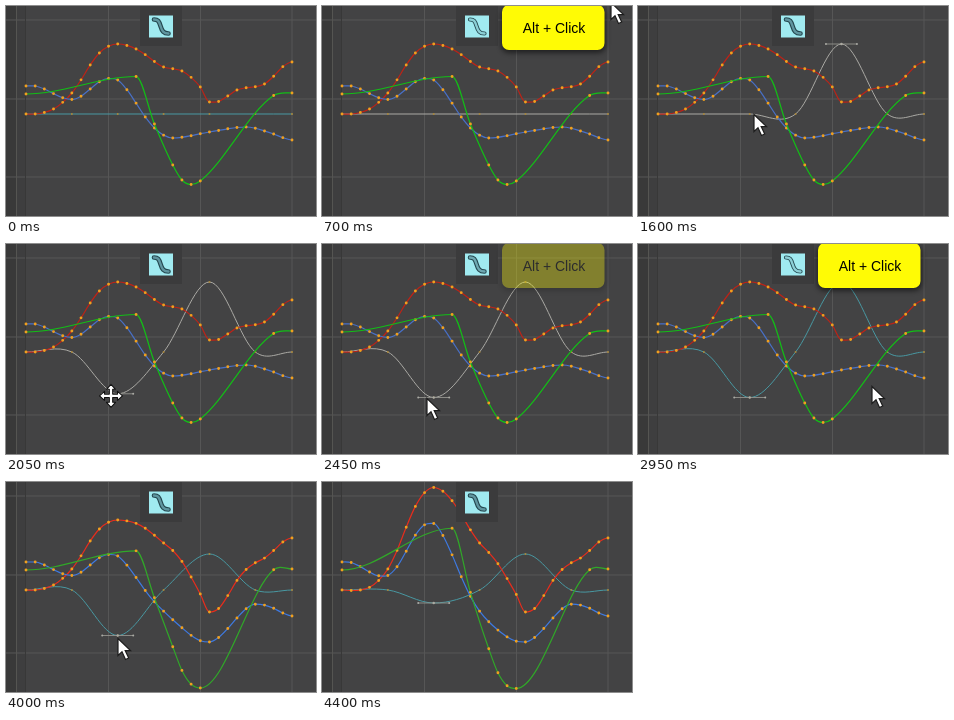
An HTML page that plays this animation: 310 by 210 pixels, repeating every 4650 ms.

```html
<!DOCTYPE html>
<html lang="en">
<head>
<meta charset="utf-8">
<title>Graph editor</title>
<style>
  html, body { margin: 0; width: 100%; height: 100%; overflow: hidden; background: #434344; }
  svg { display: block; width: 100vw; height: 100vh; }
</style>
</head>
<body>
<svg viewBox="0 0 310 210">
  <defs>
    <filter id="blur" x="-20%" y="-40%" width="140%" height="180%"><feGaussianBlur stdDeviation="2.5"/></filter>
  </defs>
  <rect width="310" height="210" fill="#434344"/>
  <rect x="11" width="8" height="210" fill="#3e3e3f"/>
  <rect width="10" height="210" fill="#393939"/>
  <path d="M0 14H310M0 93H310M0 171H310M102.5 0V210M194.5 0V210M286 0V210" stroke="#565656"/>
  <path d="M10.5 0V210" stroke="#555552"/>
  <path d="M19.5 0V210" stroke="#383838"/>
  <g id="curves" fill="none" stroke-linecap="round"></g>
  <g id="handle" stroke="#93938e" fill="#aaaaa4">
    <path d="M-15.5 0H15.5" stroke-width=".9"/>
    <g stroke="none"><circle cx="-15.5" r="1"/><circle cx="15.5" r="1"/><circle r="1.2"/></g>
  </g>
  <rect x="134" width="42" height="40" fill="#3b3b3c"/>
  <rect x="143" y="9.5" width="24" height="22" fill="#a0eaf0"/>
  <g fill="none" stroke-linecap="round">
    <path id="glyph" d="M148 13.5C152 13.5 153 15 154.5 20S157.500 27.500 162.500 27.500" stroke="#24474f"/>
    <path id="core" d="M148 13.5C152 13.5 153 15 154.5 20S157.500 27.500 162.500 27.500"/>
  </g>
  <g id="popup">
    <rect x="179" y="1" width="105" height="46" rx="8" fill="#000" opacity=".5" filter="url(#blur)"/>
    <rect x="180" y="-1" width="102.5" height="45" rx="7" fill="#fffb05"/>
    <text x="232" y="27" text-anchor="middle" font-family="'Liberation Sans', Arial, sans-serif" font-size="14" fill="#000">Alt + Click</text>
  </g>
  <path id="arrow" d="M0 .5V17.500L4 13.7L7.500 21.500L10.700 20L7.200 12.600H12.500Z" fill="#fff" stroke="#1c1c1c" stroke-width="1.2"/>
  <path id="move" fill="#fff" stroke="#111" stroke-width="1.1" stroke-linejoin="round"/>
</svg>
<script>
const LOOP = 4650, STEP = 50;
const $ = id => document.getElementById(id);
const ramp = (t, a, b) => Math.max(0, Math.min(1, (t - a) / (b - a)));
const easeOut = p => 1 - (1 - p) ** 2;
const smooth = p => p * p * (3 - 2 * p);
const mix = (a, b, p) => a + (b - a) * p;
const blend = (a, b, p) => `rgb(${a.map((v, i) => Math.round(mix(v, b[i], p)))})`;
const keyX = i => 20 + i * 266 / 29;
const r = v => v.toFixed(2);

// Automatic tangents: flat at ends and peaks, mean of the neighbouring slopes elsewhere.
function withTangents(pts) {
  const slope = i => (pts[i + 1].y - pts[i].y) / (pts[i + 1].x - pts[i].x);
  return pts.map((p, i) => {
    const inner = i > 0 && i < pts.length - 1;
    const m = inner && slope(i - 1) * slope(i) >= 0 ? (slope(i - 1) + slope(i)) / 2 : 0;
    return { ...p, m };
  });
}
const spline = keys => withTangents(keys.map(([i, y]) => ({ x: keyX(i), y })));

function valueAt(pts, x) {
  let i = 0;
  while (i < pts.length - 2 && x > pts[i + 1].x) i++;
  const a = pts[i], b = pts[i + 1], h = b.x - a.x, t = (x - a.x) / h, u = 1 - t;
  return mix(a.y, b.y, smooth(t)) + h * t * u * (a.m * u - b.m * t);
}

const pathOf = pts => pts.map((b, i) => {
  if (!i) return `M${r(b.x)} ${r(b.y)}`;
  const a = pts[i - 1], h = (b.x - a.x) / 3;
  return `C${r(a.x + h)} ${r(a.y + a.m * h)} ${r(b.x - h)} ${r(b.y - b.m * h)} ${r(b.x)} ${r(b.y)}`;
}).join('');
const dotsOf = pts => pts.map(p => `M${r(p.x)} ${r(p.y)}h.01`).join('');

// Replace a sparse curve with one key on each of the 30 steps.
function bake(keys) {
  const pts = spline(keys);
  return Array.from({ length: 30 }, (_, i) => ({ x: keyX(i), y: valueAt(pts, keyX(i)) }));
}

const channels = [
  { dim: [190, 34, 22], lit: [232, 44, 28],
    pts: bake([[0, 108], [1, 108], [3, 103], [5, 87], [8, 47], [10, 38], [12, 43], [15, 61], [17, 65],
      [19, 81], [20, 96], [21, 95.5], [23, 84], [26, 78], [29, 56]]) },
  { dim: [72, 112, 200], lit: [62, 122, 226],
    pts: bake([[0, 80], [1, 80], [5, 93.5], [9, 72.5], [10, 74], [14, 122], [16, 132], [20, 126],
      [24, 121], [27, 128], [29, 134]]) },
  { dim: [18, 190, 22], lit: [48, 168, 40],
    pts: spline([[0, 88], [12, 70.5], [14, 118], [16, 159], [17, 174], [18, 178.5], [19, 175],
      [27, 89.5], [29, 87]]) }
];

function addPath(width, color) {
  const p = document.createElementNS('http://www.w3.org/2000/svg', 'path');
  p.setAttribute('stroke-width', width);
  if (color) p.setAttribute('stroke', color);
  $('curves').append(p);
  return p;
}

const layerLine = addPath(1), layerDots = addPath(2, '#a8863a');
for (const c of channels) {
  c.line = addPath(1.2);
  c.dots = addPath(2.9, '#f0a01e');
}
$('move').setAttribute('d', 'M0-11.5L4.5-6.5H1.7V-1.7H6.5V-4.5L11.5 0L6.5 4.5V1.7H1.7V6.5H4.5L0 11.5L-4.5 6.5H-1.7V1.7H-6.5V4.5L-11.5 0L-6.5-4.5V-1.7H-1.7V-6.5H-4.5Z');

// The layer is flat apart from two keys that get dragged.
const REST = 108, LOW = 153.5, HIGH = 38;
const LOW_KEY = 10, HIGH_KEY = 20;

function layerAt(t) {
  const low = mix(REST, LOW, easeOut(ramp(t, 1850, 2130)));
  const high = mix(REST, HIGH, smooth(ramp(t, 1050, 1450)));
  return {
    low: mix(low, 121, easeOut(ramp(t, 4050, 4400))),
    high: mix(high, 72, easeOut(ramp(t, 3350, 3600)))
  };
}
const layerSpline = (low, high) => spline([0, 5, LOW_KEY, 15, HIGH_KEY, 25, 29].map(i =>
  [i, i === LOW_KEY ? low : i === HIGH_KEY ? high : REST]));
const base = layerSpline(LOW, HIGH);

const drags = [
  { from: 1050, to: 1450, key: 'high', gap: 6 },
  { from: 1850, to: 2150, key: 'low', gap: 2 },
  { from: 3350, to: 3650, key: 'high', gap: 6 },
  { from: 4050, to: 4400, key: 'low', gap: 3 }
];
const waypoints = [
  [700, 289, -4], [1000, 203, 108], [1450, 203, 44], [1600, 116, 108], [1850, 105, 109],
  [2150, 105, 154], [2750, 105, 154], [2950, 234, 142], [3200, 234, 142], [3300, 204, 44],
  [3650, 204, 78], [4000, 112, 156], [4400, 112, 124]
];

function pointerAt(t, layer) {
  const i = waypoints.findIndex(w => w[0] > t);
  if (i < 1) return null;
  const [a, x0, y0] = waypoints[i - 1], [b, x1, y1] = waypoints[i];
  const p = smooth(ramp(t, a, b));
  const drag = drags.find(d => t >= d.from && t < d.to);
  return { x: mix(x0, x1, p), y: drag ? layer[drag.key] + drag.gap : mix(y0, y1, p), drag };
}

const selectedAt = t =>
  t < 1050 ? null : t < 1700 ? 'high' : t < 3300 ? 'low' : t < 4000 ? 'high' : 'low';

const place = (id, x, y) => $(id).setAttribute('transform', `translate(${r(x)} ${r(y)})`);
const show = (id, on) => $(id).setAttribute('display', on ? 'inline' : 'none');

function draw(t) {
  const state = layerAt(t), layer = layerSpline(state.low, state.high);
  const white = ramp(t, 300, 550) * (1 - ramp(t, 2700, 2900));
  layerLine.setAttribute('d', pathOf(layer));
  layerLine.setAttribute('stroke', blend([72, 152, 162], [170, 169, 164], white));
  layerDots.setAttribute('d', dotsOf(layer));

  // Once applied, every change of the layer is added to the other curves.
  const active = t >= 3350;
  for (const c of channels) {
    const pts = withTangents(c.pts.map(({ x, y }) =>
      ({ x, y: active ? y + valueAt(layer, x) - valueAt(base, x) : y })));
    c.line.setAttribute('d', pathOf(pts));
    c.line.setAttribute('stroke', blend(c.dim, c.lit, active ? 1 : 0));
    c.dots.setAttribute('d', dotsOf(pts));
  }

  const key = selectedAt(t);
  show('handle', key);
  if (key) place('handle', keyX(key === 'low' ? LOW_KEY : HIGH_KEY), state[key]);

  const pop = Math.max(
    ramp(t, 100, 250) * (1 - ramp(t, 750, 900)),
    ramp(t, 2400, 2550) * (1 - ramp(t, 3150, 3300)));
  show('popup', pop > 0);
  $('popup').setAttribute('opacity', pop);
  $('glyph').setAttribute('stroke-width', mix(4.6, 4.2, pop));
  $('core').setAttribute('stroke-width', 2.4);
  $('core').setAttribute('stroke', blend([96, 150, 160], [140, 208, 214], pop));

  const pointer = pointerAt(t, state);
  show('arrow', pointer && !pointer.drag);
  show('move', pointer && pointer.drag);
  if (pointer) place(pointer.drag ? 'move' : 'arrow', pointer.x, pointer.y);
}

const start = performance.now();
function tick() {
  const t = (performance.now() - start) % LOOP;
  draw(Math.floor(t / STEP) * STEP);
  requestAnimationFrame(tick);
}
tick();
</script>
</body>
</html>
```
